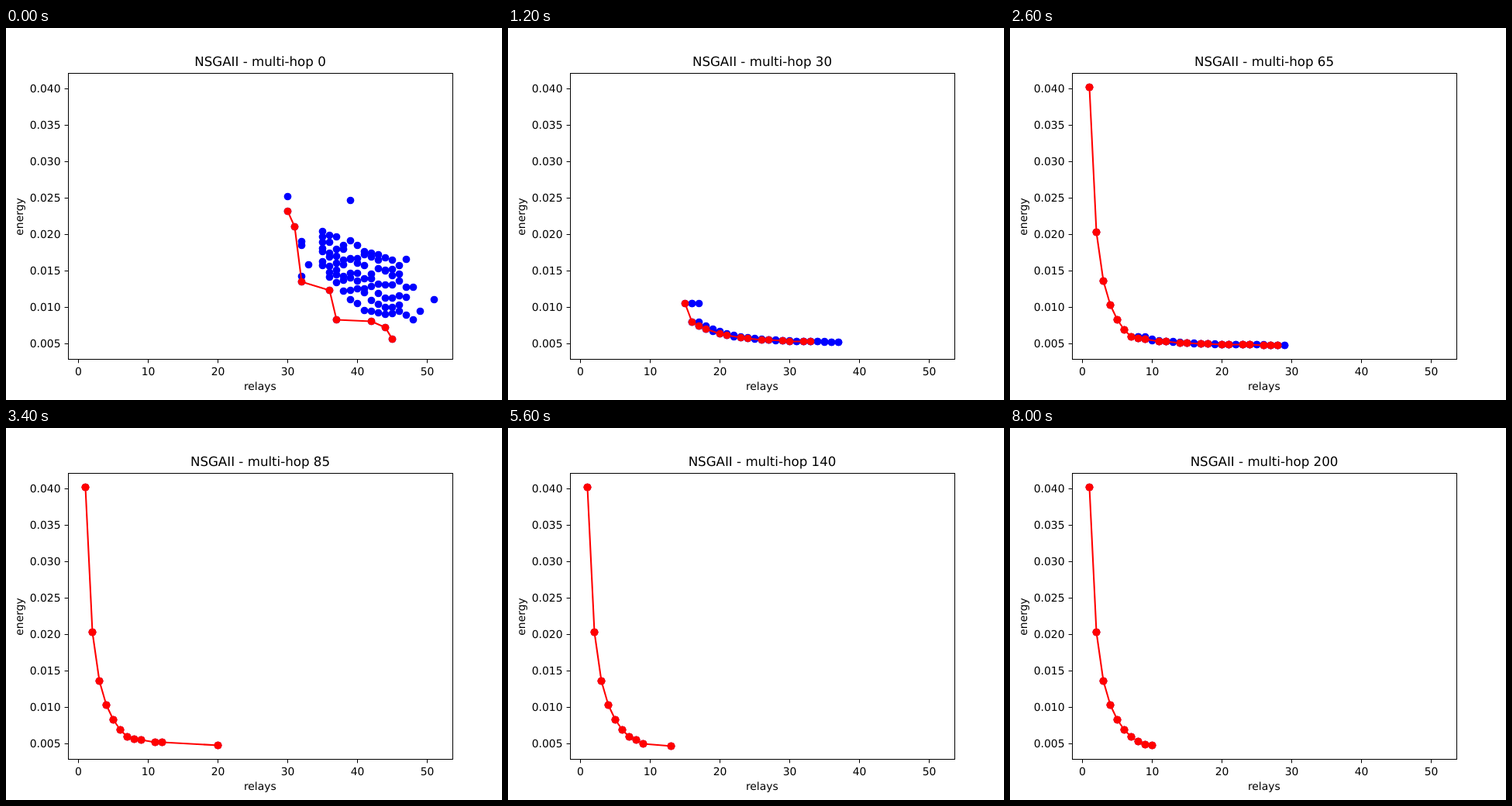
Write an HTML page that moves like this. It is 640 px wide and 480 px high and loops after 8200 ms.

```html
<!DOCTYPE html>
<html lang="en">
<head>
<meta charset="utf-8">
<title>Pareto front</title>
<style>
  html, body { margin: 0; width: 100%; height: 100%; overflow: hidden; background: #fff; }
  svg { display: block; width: 640px; height: 480px; }
  text { font: 13.889px "DejaVu Sans", sans-serif; fill: #000; text-rendering: geometricPrecision; }
  #title { font-size: 16.667px; }
  .mid { text-anchor: middle; }
  .end { text-anchor: end; }
  .axis { fill: none; stroke: #000; }
  #line { fill: none; stroke: #f00; stroke-width: 2.083; stroke-linejoin: round; stroke-linecap: square; }
</style>
</head>
<body>
<svg viewBox="0 0 640 480">
  <g id="cloud" fill="#00f"></g>
  <g id="front" fill="#f00"></g>
  <path id="line"/>
  <g id="axes"><rect class="axis" x="80.5" y="58.5" width="496" height="369"/></g>
  <text id="title" class="mid" x="328" y="49"></text>
  <text class="mid" x="327.8" y="467">relays</text>
  <text class="mid" transform="translate(22 243.5) rotate(-90)">energy</text>
</svg>
<script>
const STEP = 200, STEPS = 41, GENS = 5, SETTLED = 15, MERGED = 65;
const $ = id => document.getElementById(id);
const px = relays => 93.5 + 9 * relays;
const py = y => Math.round(y) + 0.5;
const lerp = (a, b, k) => a + (b - a) * k;

// lo, hi: ends of the front; reach: last crowded column; top: height at lo.
// Past its knee the front nears `end` from `drop` above it, at the rate `tau`.
const stages = [
  { gen: 0, lo: 30, hi: 45, reach: 48, top: 236, drop: 120, end: 400, tau: 3 },
  { gen: SETTLED, lo: 23, hi: 34, reach: 41, top: 344, drop: 19, end: 403, tau: 4.5 },
  { gen: 45, lo: 7, hi: 33, reach: 34, top: 365, drop: 33, end: 407, tau: 5 },
  { gen: MERGED, lo: 1, hi: 28, reach: 29, top: 410, drop: 9, end: 409, tau: 6 },
  { gen: 85, lo: 1, hi: 20, reach: 12, top: 410, drop: 9, end: 410, tau: 6 },
  { gen: 120, lo: 1, hi: 16, reach: 11, top: 410, drop: 9, end: 410, tau: 1 },
  { gen: 165, lo: 1, hi: 10, reach: 10, top: 410, drop: 6, end: 410, tau: 1 }
];
const firstFront = [[30, 236], [31, 256], [32, 327], [36, 338], [37, 376], [42, 378], [44, 386], [45, 401]];
const strays = [[30, 217], [32, 275], [32, 280], [32, 320], [33, 305], [39, 222], [49, 365], [51, 350]];

function seeded(seed) {
  return () => (seed = seed * 16807 % 2147483647) / 2147483647;
}

// The first population: jittered columns between a sloping top and a curved floor.
function scatter() {
  const rand = seeded(77), points = [...strays];
  for (let r = 35; r <= 48; r++) {
    const n = Math.min(7, 2 * (49 - r));
    const high = 262 + 3 * (r - 35), low = 380 - 72 * Math.exp((35 - r) / 4);
    for (let i = 0; i < n; i++) points.push([r, lerp(high, low, (i + rand()) / n)]);
  }
  return points;
}
const firstCloud = scatter();

const settle = gen => 1 - (1 - Math.min(1, gen / SETTLED)) ** 2;

function stageAt(gen) {
  const i = stages.findIndex(s => s.gen > gen);
  if (i < 0) return stages[stages.length - 1];
  const a = stages[i - 1], b = stages[i];
  const k = gen < SETTLED ? settle(gen) : (gen - a.gen) / (b.gen - a.gen);
  const mix = {};
  for (const name in a) mix[name] = lerp(a[name], b[name], k);
  for (const name of ["lo", "hi", "reach"]) mix[name] = Math.floor(mix[name]);
  return mix;
}

function populationAt(gen) {
  const { lo, hi, reach, top, drop, end, tau } = stageAt(gen);
  const knee = Math.max(lo + 1, 8);
  const height = r => {
    const curve = r <= lo ? top : end - drop * Math.exp(-Math.max(0, r - knee) / tau);
    return Math.min(curve, 451.2 - 375.5 / r);
  };

  const front = gen === 0 ? firstFront : [];
  const cloud = [];
  if (gen > 0) {
    for (let r = lo; r <= hi; r++) {
      if (r <= knee || r === hi || (r <= reach && r % 3 !== 1)) front.push([r, height(r)]);
    }
  }
  if (gen < SETTLED) {
    for (const [r, y] of firstCloud) {
      const col = r + lo - stages[0].lo;
      cloud.push([col, lerp(y, height(col), settle(gen))]);
    }
  } else if (reach > hi) {
    // Dominated points repeat the height of the column before them.
    for (let r = knee; r <= reach; r++) {
      cloud.push([r, height(r)], [r, height(r - 1)]);
      if (r < knee + 2) cloud.push([r, height(knee - 1)]);
    }
  }
  return { front, cloud };
}

const dots = points => points
  .map(([r, y]) => `<circle cx="${px(r)}" cy="${py(y)}" r="4.86"/>`).join("");

function draw(gen) {
  const { front, cloud } = populationAt(gen);
  const reds = dots(front);
  $("cloud").innerHTML = dots(cloud) + reds;
  $("front").innerHTML = reds.repeat(gen < MERGED ? 1 : 3);
  $("line").setAttribute("d", "M" + front.map(([r, y]) => `${px(r)} ${py(y)}`).join("L"));
  $("title").textContent = `NSGAII - multi-hop ${gen}`;
}

let axes = "";
for (let i = 0; i < 6; i++) {
  const x = px(10 * i);
  axes += `<path class="axis" d="M${x} 427.5V432.3"/><text class="mid" x="${x}" y="448">${10 * i}</text>`;
}
for (let i = 1; i <= 8; i++) {
  const y = 454.5 - 47 * i;
  axes += `<path class="axis" d="M80.5 ${y}H75.6"/><text class="end" x="70.5" y="${y + 4.5}">${(0.005 * i).toFixed(3)}</text>`;
}
$("axes").insertAdjacentHTML("beforeend", axes);

let shown = -1;
const start = performance.now();
function tick() {
  const step = Math.floor((performance.now() - start) / STEP) % STEPS;
  if (step !== shown) draw((shown = step) * GENS);
  requestAnimationFrame(tick);
}
tick();
</script>
</body>
</html>
```
